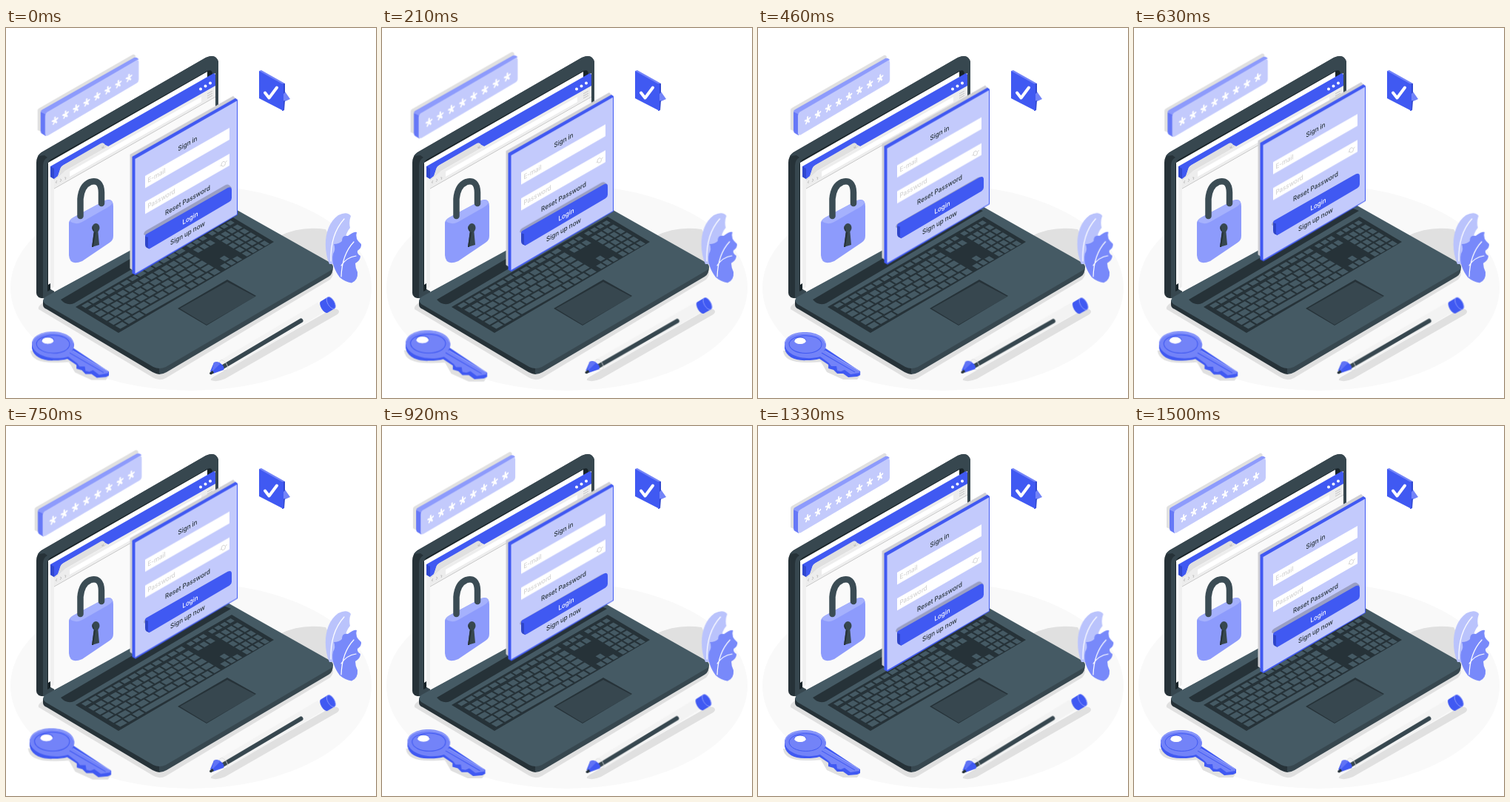
Animation of 500x500 px, one loop 1540 ms. Source, as an HTML page:

```html
<!DOCTYPE html>
<html lang="en">
<head>
<meta charset="utf-8">
<title>Sign in</title>
<style>
html, body { margin: 0; width: 100%; height: 100%; overflow: hidden; background: #fff; }
svg { display: block; width: 100vw; height: 100vh; }
text { font: 500 9.2px Inter, Lato, sans-serif; fill: #263238; text-anchor: middle; }
text.hint { fill: #d2d2d2; text-anchor: start; }
.blue { fill: #4059f2; }
.soft { fill: #c3cafc; }
.mid { fill: #8d9bfc; }
.slate { fill: #455a64; }
.dim { fill: #37474f; }
.ink { fill: #263238; }
.shade { fill: #e0e0e0; }
.white { fill: #fff; }
.line { fill: none; stroke: #fff; stroke-linecap: round; stroke-linejoin: round; }

.swing { animation: 770ms cubic-bezier(.37, 0, .63, 1) infinite alternate; }
#panel { animation-name: float; animation-delay: -45ms; }
#drop { animation-name: sink; animation-delay: -45ms; }
#pen { animation-name: tilt; animation-delay: -385ms; transform-origin: 360px 420px; }
#leaves { animation-name: sway; animation-delay: -385ms; transform-origin: 442px 330px; }
.pulse { animation: pulse 1540ms ease-in-out infinite; }
#code { transform-origin: 111px 90px; }
#key { transform-origin: 87px 441px; }

@keyframes float { to { transform: translateY(-19.5px); } }
@keyframes sink { to { transform: translateY(6px); } }
@keyframes tilt { from { transform: rotate(-1deg); } to { transform: rotate(1deg); } }
@keyframes sway { from { transform: rotate(.6deg); } to { transform: rotate(-.6deg); } }
@keyframes pulse {
  0% { transform: scale(1.02); }
  14%, 49.7% { transform: scale(1.08); }
  31.8%, 67.5%, 100% { transform: scale(1); }
}
</style>
</head>
<body>
<svg viewBox="0 0 500 500">
  <ellipse cx="250" cy="351" rx="244" ry="139" fill="#f9f9f9"/>

  <!-- ground shadows -->
  <path class="shade" d="M370 281Q398 267 432 272L446 300L443 322ZM44 380Q42 377 50 371L207 460L441 328Q444 333 438 340L216 473Q207 478 198 472Z"/>

  <!-- laptop lid -->
  <path class="ink" d="M41 182Q41 173 48 168L270 40Q284 34 287 46V250L58 365Q41 367 41 358Z"/>
  <path class="dim" d="M43 173Q45 170 48 168L270 40Q284 34 287 46V250L58 365L50 365V186Q50 178 56 175L52 172Z"/>
  <path fill="#192429" d="M56 186Q56 181 60 178L272 58Q279 55 279 63V240L56 356Z"/>
  <path class="white" d="M57 182L272 59V80L60 215V345L57 347Z"/>

  <!-- browser window -->
  <path fill="#f0f0f0" d="M60 187L66 184V356L60 353Z"/>
  <path class="white" d="M60 352L66 356V350Z"/>
  <path fill="#fafafa" d="M65 185L283 61V240L65 357Z"/>
  <path fill="#ededed" d="M65 202L283 78V92L65 216Z"/>
  <path class="blue" d="M60 187L281 61L283 63V78L138 160L130 156L78 185Q74 187 73 192L70 200L65 204L60 201Z"/>
  <path fill="#3047cf" d="M60 187L65 190V204L60 201Z"/>
  <path class="shade" d="M65 204L70 201L73 191Q74 187 78 185L128 156Q132 154 134 158L138 160L80 193L65 206Z"/>
  <path class="white" d="M86 194L264 93V100L86 201Z"/>
  <path fill="none" stroke="#c4c4c4" d="M65 217L283 93M69 206l-2 3 2 0M73 204l2 1-2 3M79 202l2 0-1 3M129 161l4 1M132 159l-2 4M272 89l7-4M272 92l7-4M272 95l7-4"/>
  <g class="white"><circle cx="263" cy="82.500" r="2"/><circle cx="269.500" cy="78.500" r="2"/><circle cx="276" cy="74.500" r="2"/></g>

  <!-- padlock -->
  <path class="mid" d="M85 264Q85 259 91 256L134 233Q145 229 145 241V281Q145 287 140 290L103 315Q86 322 85 307Z"/>
  <path fill="#a5b1fd" d="M86 261Q87 258 91 256L134 233Q142 231 144 236Q143 239 138 242L103 262Q94 267 86 261Z"/>
  <path fill="none" stroke="#3b4c54" stroke-width="8.500" stroke-linecap="round" d="M100.500 254V231Q102 213 114 208Q128.500 204 129 222V237"/>
  <path class="dim" d="M119 273L124 271L126 293L116 296Z"/>
  <ellipse class="dim" cx="121.500" cy="270" rx="5" ry="6"/>
  <path class="ink" d="M117 267a5 6 0 0 0 4 9L118 296H116L119 275Z"/>

  <!-- laptop base -->
  <path class="ink" d="M50 368V374Q50 378 55 380L198 465Q204 468 208 468V455Z"/>
  <path class="dim" d="M207 455V468Q212 468 217 465L436 336Q442 333 442 322Z"/>
  <path class="slate" d="M53 373Q47 367 54 363L284 237Q291 233 298 238L438 317Q446 323 438 328L216 458Q207 462 199 458Z"/>
  <path class="ink" d="M74 367L178 306L292 242L304 247L92 372Q82 376 74 367Z"/>
  <path class="ink" d="M94 377L305 255L362 289L152 412Z"/>
  <g id="keys" class="slate" transform="matrix(210 -120 57 34 95 376)"></g>
  <path class="ink" d="M232 379L299 340L338 362L271 402Z"/>
  <path class="dim" d="M235 379L299 343L337 363L271 401Z"/>

  <!-- sign-in panel -->
  <g id="panel" class="swing">
    <path fill="#cfcfd4" d="M167.500 171L307 92L311 96L172 175V328L167.500 325Z"/>
    <path class="blue" d="M170.500 174L310 95L313 97V252.500L175 334L170.500 331.500Z"/>
    <path class="soft" d="M174.500 177L312 98.500V252L174.500 332Z"/>
    <path class="white" d="M188 200L302 135V151L188 216.500ZM188 235L302 170V186L188 251.500Z"/>
    <path id="drop" class="swing" fill="#9a9fc4" d="M186 279Q186 276 189 274L297 212Q301 210 305 216L193 283Z"/>
    <path fill="#2f45c8" d="M188 281L194 283V299L190 297Q188 296 188 292Z"/>
    <path class="blue" d="M188 282Q188 279 191 278L300 216Q305 214 305 219V230Q305 233 302 235L195 298Q192 299 192 295V283Z"/>
    <g id="labels"></g>
    <path fill="none" stroke="#d4d4d4" d="M291 184.500q1-4 3-4t2.500 2q0 4-3 4.500t-2.500-2.500M289.500 187l2-2M296.500 182l2-2.500"/>
  </g>

  <!-- password bar -->
  <g id="code" class="pulse">
    <path class="shade" d="M44 111Q44 109 46 108L170 37Q173 36 174 40L50 140L44 137Z"/>
    <path fill="#6678f7" d="M48 113L55 115V145L50 142Q48 141 48 138Z"/>
    <path class="mid" d="M48 113Q48 111 50 110L172 41Q175 40 178 43L56 117Z"/>
    <path class="soft" d="M54 119Q54 115 57 113L175 44.500Q178 43 178 47V70Q178 73 175 75L58 144Q54 146 54 142Z"/>
    <g id="stars" class="line" stroke-width="2.300"></g>
  </g>

  <!-- check mark note -->
  <path fill="#7384f8" d="M342 58L345 57L377 75V86L384 96L375 100Z"/>
  <path fill="#3047cf" d="M372 76L377 75V87L374 90ZM373 99L377 98L376 111L373 112Z"/>
  <path class="blue" d="M342 58L375 76.500V112L342 95Z"/>
  <path class="line" stroke-width="4" d="M350 87.500L355.500 94.500L366 80.500"/>

  <!-- leaves -->
  <g id="leaves" class="swing">
    <path fill="#bac3fc" d="M437 319C428 298 430 266 449 253Q461 247 466 254Q463 262 465 270Q459 277 458 288L446 319Z"/>
    <path fill="#7889fa" d="M451 337C445 329 439 317 442 305Q446 299 443 292Q450 292 454 288Q454 279 462 281Q470 275 474 276Q471 285 480 292Q481 297 475 301Q474 305 479 308Q479 314 472 318Q472 324 475 330Q476 341 467 344.500Q458 343 451 337Z"/>
    <path class="line" stroke-width="1.200" d="M439 315Q438 279 457 258M453 336Q454 306 470 289M453 321Q460 310 473 308"/>
  </g>

  <!-- pen -->
  <path class="shade" d="M277 476Q276 474 281 471L440 380Q449 378 450 383Q450 386 446 388L296 474Q285 479 277 476Z"/>
  <g id="pen" class="swing">
    <path fill="#f3f3f3" d="M288 450L421 371L433 382L299 462Z"/>
    <path fill="none" stroke="#37474f" stroke-width="6" stroke-linecap="round" d="M293 458L398.500 395.500"/>
    <ellipse cx="294" cy="456" rx="4.500" ry="8" transform="rotate(-31 294 456)" fill="none" stroke="#dedede" stroke-width=".8"/>
    <path class="blue" d="M281 452Q287 450 291 454Q296 458 294 462L280 467L276 464Z"/>
    <path fill="#6073f5" d="M281 452Q286 450 290 453L278 465Z"/>
    <path class="ink" d="M279 463L275 466Q275 469 278 468L281 466Z"/>
    <g class="blue" transform="translate(435 374) rotate(-31)">
      <path d="M-6-9H5V9H-6A4 9 0 0 1-6-9Z"/>
      <ellipse cx="5" rx="4.500" ry="9" stroke="#93a0fb" stroke-width=".8"/>
    </g>
  </g>

  <!-- key -->
  <g id="key" class="pulse">
    <path class="shade" d="M34 436Q35 452 65 452Q78 452 85 451L93 465L115 475L134 475L138 469L90 438Z"/>
    <path class="blue" d="M36 428V433C38 444 50 450 66 449Q76 449 83 447L95 455V460L102 462L107 467L115 467L122 472L134 471L138 469V464L90 432Z"/>
    <path fill="#7383f8" fill-rule="evenodd" d="M36 427C36 406 90 405 92 428Q92 433 89 436L137 463V466L125 468L117 462L112 464L107 463L106 457L99 457L96 453L84 444C64 450 37 443 36 427ZM49 422.500a8 4.500 0 1 0 16 0a8 4.500 0 1 0-16 0Z"/>
    <ellipse class="white" cx="57" cy="423" rx="7" ry="3.800"/>
    <path fill="none" stroke="#4059f2" d="M42 427C43 413 84 411 86 427C86 444 43 443 42 427ZM49 422.500a8 4.500 0 0 1 16 0M86 439L131 465"/>
    <path fill="none" stroke="#a9b5fd" stroke-width=".8" d="M37 424C42 408 86 409 91 426M90 436L136 463"/>
  </g>
</svg>
<script>
const NS = 'http://www.w3.org/2000/svg';
function add(parent, tag, attrs, content = '') {
  const el = document.createElementNS(NS, tag);
  for (const name in attrs) el.setAttribute(name, attrs[name]);
  el.textContent = content;
  document.getElementById(parent).append(el);
}

// labels lie on the isometric plane
function label(content, x, y, attrs = {}) {
  add('labels', 'text', { transform: `matrix(.866 -.5 0 1 ${x} ${y})`, ...attrs }, content);
}
label('Sign in', 245.5, 159.5);
label('Reset Password', 245.5, 236);
label('Login', 249, 260, { style: 'fill:#fff' });
label('Sign up now', 245.5, 280.5);
label('E-mail', 191.5, 209.5, { class: 'hint' });
label('Password', 191.5, 244.5, { class: 'hint' });

// eight five-armed asterisks
for (let i = 0; i < 8; i++) {
  let d = '';
  for (let k = 0; k < 5; k++) {
    const a = (k * 72 - 90) * Math.PI / 180;
    d += `M0 0L${(4 * Math.cos(a)).toFixed(2)} ${(4.2 * Math.sin(a)).toFixed(2)}`;
  }
  add('stars', 'path', { d, transform: `matrix(.866 -.5 0 1 ${67 + i * 14} ${124.5 - i * 8.1})` });
}

// keyboard in unit coordinates: u along the rows, v across them
function key(u, row, w) {
  add('keys', 'rect', { x: u + .005, y: .03 + row * .16 + .018, width: w - .01, height: row ? .122 : .095 });
}
function run(from, to, row, n) {
  const w = (to - from) / n;
  for (let i = 0; i < n; i++) key(from + i * w, row, w);
}
run(.015, .67, 0, 13);
run(.015, .67, 1, 14);
run(.015, .67, 2, 13);
run(.015, .67, 3, 12);
run(.015, .67, 4, 11);
run(.015, .18, 5, 3);
key(.18, 5, .29);
run(.47, .67, 5, 4);
run(.69, .81, 0, 3);
run(.69, .81, 1, 3);
key(.73, 4, .04);
run(.69, .81, 5, 3);
for (let row = 0; row < 6; row++) run(.83, .985, row, 4);
</script>
</body>
</html>
```
